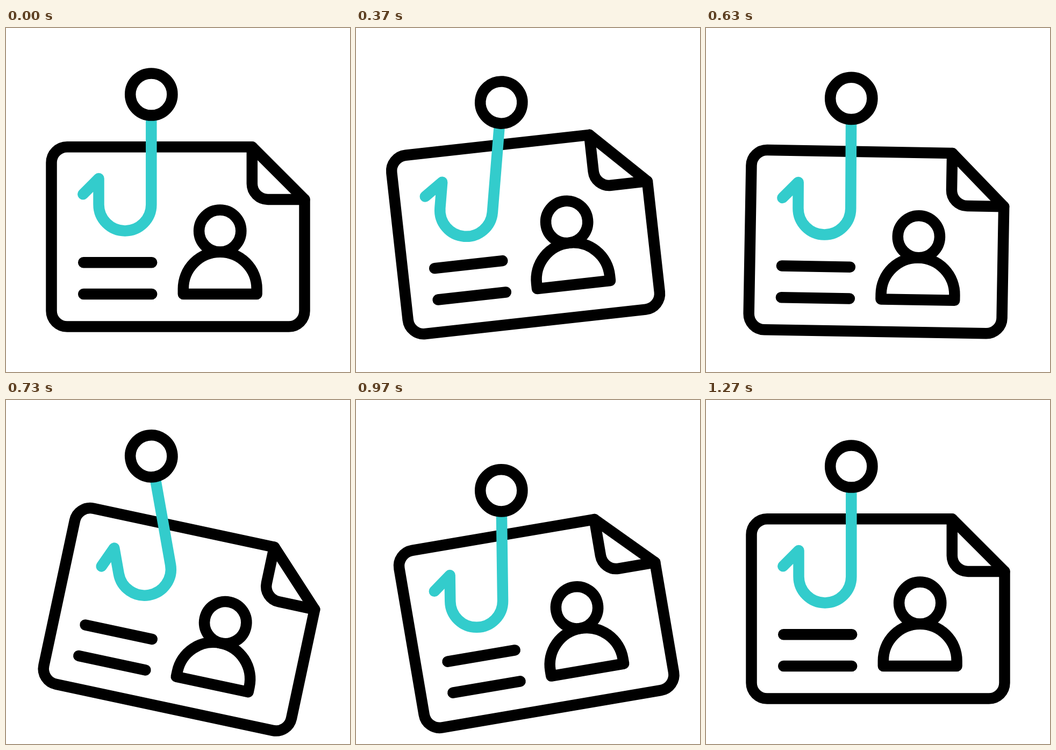
These frames come from a looping animation (640 px wide and 640 px high, 1.67 s). An HTML page with a canvas:

```html
<!DOCTYPE html>
<html lang="en">
<head>
<meta charset="utf-8">
<title>Card on a hook</title>
<style>
html, body { margin: 0; width: 100%; height: 100%; overflow: hidden; background: #fff; }
canvas { display: block; width: 100vmin; height: 100vmin; }
</style>
</head>
<body>
<canvas id="stage" width="640" height="640"></canvas>
<script>
const ctx = document.getElementById('stage').getContext('2d');
const LOOP = 1670;
const INK = '#000', TEAL = '#33cccc';

// Key poses as [frame, value], at 30 frames per second.
const lift = [[6.8, 0], [15.4, 31.2], [23.2, -22.6], [29.9, 48.3], [37.7, 0]];
const swing = [[6.8, 0], [15.4, 9.55], [23.2, -11.37], [30.1, 0]];
const tilt = [[6.8, 0], [14.75, -11.67], [23.2, 13.43], [30.1, -11.35], [37.83, 0]];

const ring = { x: 270.3, y: 123.5 };
const grip = { x: 183, y: 297 };

const circle = (x, y, r) => {
  const p = new Path2D();
  p.arc(x, y, r, 0, Math.PI * 2);
  return p;
};

const card = [
  new Path2D('M457.8 221.2H113.8A29.3 29.3 0 0 0 84.5 250.5V526.2A29.3 29.3 0 0 0 113.8 555.5' +
    'H526.2A29.3 29.3 0 0 0 555.5 526.2V319Z'),
  new Path2D('M457.8 221.2V289.6A29.3 29.3 0 0 0 487.1 318.9H555.5'),
  new Path2D('M144.2 436.2H271.2M144.2 495H271.2'),
  circle(398.2, 377.6, 39.1),
  new Path2D('M329.8 495V485.2A68.4 68.4 0 0 1 466.6 485.2V495Z')
];
const hook = new Path2D('M270.3 165V328.5A48.9 48.9 0 0 1 172.5 328.5V280L143.3 309.3');
const eye = circle(ring.x, ring.y, 39.1);

function valueAt(keys, n) {
  if (n <= keys[0][0]) return keys[0][1];
  for (let i = 1; i < keys.length; i++) {
    const [a, from] = keys[i - 1], [b, to] = keys[i];
    if (n < b) {
      const u = (n - a) / (b - a);
      return from + (to - from) * u * u * (3 - 2 * u);
    }
  }
  return keys[keys.length - 1][1];
}

// Steps fall at 0, 30 and 70 ms of every tenth of a second.
function frameAt(ms) {
  const r = ms % 100;
  return 3 * Math.floor(ms / 100) + (r >= 30) + (r >= 70);
}

function turn(p, deg) {
  ctx.translate(p.x, p.y);
  ctx.rotate(deg * Math.PI / 180);
  ctx.translate(-p.x, -p.y);
}

function draw(n) {
  const sway = valueAt(swing, n);
  ctx.setTransform(1, 0, 0, 1, 0, 0);
  ctx.fillStyle = '#fff';
  ctx.fillRect(0, 0, 640, 640);
  ctx.lineWidth = 20.5;
  ctx.lineCap = ctx.lineJoin = 'round';

  ctx.translate(0, valueAt(lift, n));
  turn(ring, sway);

  // The card hangs from the hook but keeps its own tilt.
  ctx.save();
  turn(grip, valueAt(tilt, n) - sway);
  ctx.strokeStyle = INK;
  card.forEach(p => ctx.stroke(p));
  ctx.restore();

  ctx.strokeStyle = TEAL;
  ctx.stroke(hook);
  ctx.strokeStyle = INK;
  ctx.stroke(eye);
}

const start = performance.now();
function tick() {
  draw(frameAt((performance.now() - start) % LOOP));
  requestAnimationFrame(tick);
}
tick();
</script>
</body>
</html>
```
